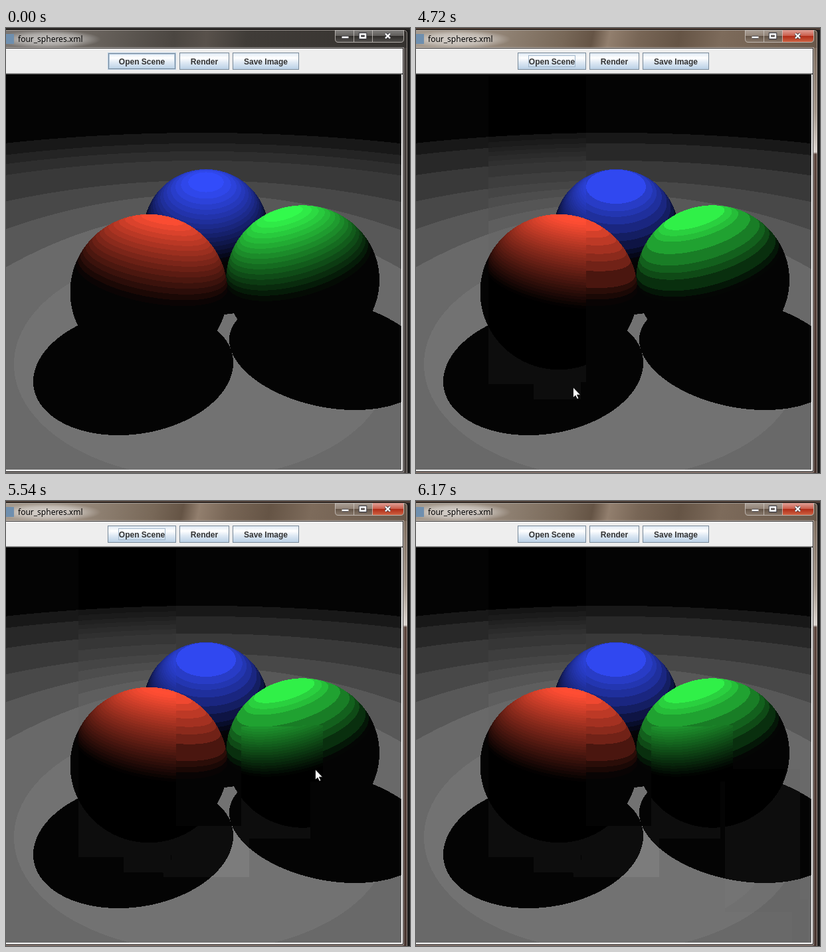
Recreate the animation shown at these times as an HTML page with a canvas. Size 608 by 671 pixels, loop 6270 ms.

```html
<!DOCTYPE html>
<html lang="en">
<head>
<meta charset="utf-8">
<title>four_spheres.xml</title>
<style>
html, body { margin: 0; width: 608px; height: 671px; overflow: hidden; background: #1e1e1e; }
canvas, svg { position: absolute; left: 0; top: 0; display: block; }
.label { font: bold 12px "Liberation Sans", Arial, sans-serif; fill: #333; text-anchor: middle; }
.title { font: 12px "Noto Sans", "Open Sans", sans-serif; fill: #000; }
</style>
</head>
<body>
<canvas id="scene" width="608" height="671"></canvas>
<svg width="608" height="671" viewBox="0 0 608 671">
  <defs>
    <linearGradient id="dim" gradientUnits="userSpaceOnUse" x1="0" y1="0" x2="600" y2="60">
      <stop offset="0" stop-color="#7b7672"/><stop offset=".2" stop-color="#6c6660"/>
      <stop offset=".42" stop-color="#4b4641"/><stop offset=".5" stop-color="#58514b"/>
      <stop offset=".6" stop-color="#403c38"/><stop offset="1" stop-color="#35322f"/>
    </linearGradient>
    <linearGradient id="wood" gradientUnits="userSpaceOnUse" x1="0" y1="0" x2="600" y2="120">
      <stop offset="0" stop-color="#a59a8e"/><stop offset=".2" stop-color="#938577"/>
      <stop offset=".36" stop-color="#786858"/><stop offset=".43" stop-color="#655445"/>
      <stop offset=".47" stop-color="#927f6e"/><stop offset=".54" stop-color="#786656"/>
      <stop offset=".64" stop-color="#655445"/><stop offset=".74" stop-color="#7d6b5b"/>
      <stop offset="1" stop-color="#675648"/>
    </linearGradient>
    <linearGradient id="side" x1="0" y1="0" x2="0" y2="1">
      <stop offset="0" stop-color="#7d6c5e"/><stop offset=".15" stop-color="#a3968a"/>
      <stop offset=".245" stop-color="#dcd5d0"/><stop offset=".25" stop-color="#5d473f"/>
      <stop offset="1" stop-color="#493731"/>
    </linearGradient>
    <radialGradient id="glow">
      <stop offset="0" stop-color="#fff" stop-opacity=".62"/>
      <stop offset=".6" stop-color="#fff" stop-opacity=".4"/>
      <stop offset="1" stop-color="#fff" stop-opacity="0"/>
    </radialGradient>
    <linearGradient id="steel" x1="0" y1="0" x2="0" y2="1">
      <stop offset="0" stop-color="#dde8f3"/><stop offset=".3" stop-color="#fff"/>
      <stop offset=".6" stop-color="#dde8f3"/><stop offset="1" stop-color="#b8cfe5"/>
    </linearGradient>
    <linearGradient id="glass" x1="0" y1="0" x2="0" y2="1">
      <stop offset="0" stop-color="#fff" stop-opacity=".38"/>
      <stop offset=".48" stop-color="#fff" stop-opacity=".2"/>
      <stop offset=".5" stop-color="#000" stop-opacity=".18"/>
      <stop offset="1" stop-color="#fff" stop-opacity=".12"/>
    </linearGradient>
    <linearGradient id="red" x1="0" y1="0" x2="0" y2="1">
      <stop offset="0" stop-color="#e0a298"/><stop offset=".48" stop-color="#cb5d4b"/>
      <stop offset=".5" stop-color="#ae2a16"/><stop offset="1" stop-color="#cf6242"/>
    </linearGradient>
  </defs>

  <g id="idle">
    <path d="M0 0H608V3H0z" fill="#2b2826"/>
    <path d="M0 3H600Q604 3 604 7V31H0z" fill="url(#dim)"/>
    <path d="M597 30H604V671H0V668H597z" fill="#47413e"/>
  </g>
  <g id="active">
    <path d="M0 0H608V3H0z" fill="#4d3d35"/>
    <path d="M0 3H600Q604 3 604 7V31H0z" fill="url(#wood)"/>
    <path d="M597 30H604V671H597z" fill="url(#side)"/>
    <path d="M0 668H597V671H0z" fill="#5a463e"/>
  </g>
  <path d="M0 2.5H600Q604.5 3 604.5 8V671" fill="none" stroke="#141211"/>
  <path d="M0 3.5H599Q603.5 4 603.5 8V671" fill="none" stroke="#cfc8c3" stroke-opacity=".6"/>
  <ellipse cx="65" cy="17" rx="78" ry="14" fill="url(#glow)"/>
  <rect x="0" y="9" width="12" height="15" fill="#6f8fae"/>
  <text class="title" x="18" y="21">four_spheres.xml</text>

  <path d="M495.500 3V17Q495.500 21.500 500 21.500H594Q598.500 21.500 598.500 17V3z" fill="url(#glass)"/>
  <path id="close" d="M551 3V21H594Q598 21 598 17V3z" fill="url(#red)"/>
  <path d="M495.500 3V17Q495.500 21.500 500 21.500H594Q598.500 21.500 598.500 17V3M523.500 3V21M551.500 3V21" fill="none" stroke="#d5cfcb" stroke-opacity=".75"/>
  <g fill="none" stroke="#3d3d45" stroke-width="4">
    <path d="M506 14H515M533 9H541V15H533z" stroke-width="4.500"/>
    <path d="M571 8.500L578 15.500M578 8.500L571 15.500"/>
  </g>
  <g fill="none" stroke="#fff" stroke-width="2.400">
    <path d="M505.500 14H515.500M533 9.200H541V14.800H533z"/>
    <path d="M571 8.500L578 15.500M578 8.500L571 15.500"/>
  </g>

  <path d="M0 30H597V69H0z" fill="#eee"/>
  <path d="M596 70V667H0" fill="none" stroke="#fff" stroke-width="2"/>
  <path d="M0 29.500H598.500V669.500H0" fill="none" stroke="#fff" stroke-opacity=".5"/>
  <path d="M0 30.500H597.500V668.500H0" fill="none" stroke="#2c2827"/>
  <path d="M0 68.500H597" stroke="#9a9a9a"/>
  <path d="M0 69.500H596" stroke="#555"/>
  <g fill="url(#steel)" stroke="#7a8a99">
    <rect x="153.500" y="37.500" width="102" height="25"/>
    <rect x="261.500" y="37.500" width="74" height="25"/>
    <rect x="341.500" y="37.500" width="99" height="25"/>
  </g>
  <g id="hover" fill="none" stroke="#b8cfe5">
    <rect x="153.500" y="37.500" width="102" height="25"/>
    <rect x="154.500" y="38.500" width="100" height="23" stroke="#7a8a99"/>
    <rect x="155.500" y="39.500" width="98" height="21"/>
  </g>
  <rect id="focus" x="169.500" y="41.500" width="70" height="17" fill="none" stroke="#a3b8cc"/>
  <g class="label">
    <text x="204.500" y="55">Open Scene</text>
    <text x="298.500" y="55">Render</text>
    <text x="391" y="55">Save Image</text>
  </g>
  <path id="cursor" d="M.5.800V16.500L4 13.200 6.600 18.500 8.900 17.400 6.400 12.200H11.500z" fill="#fff" stroke="#000" stroke-width=".8"/>
</svg>
<script>
const LOOP = 6270, W = 595, TOP = 70, BOTTOM = 666;
const FINE = 0, COARSE = 1, SMOOTH = 2;
const $ = id => document.getElementById(id);
const rad = deg => deg * Math.PI / 180;

// dist: eye distance, az/tilt: light direction, lamp: light distance (in radii)
const spheres = [
  { x: 215, y: 398, rx: 118.5, ry: 117.2, dist: 4.6, az: 79.5, tilt: 67, lamp: 3.5,
    rgb: [255, 77, 51], cuts: [.87, .79, .695, .59, .5, .385, .196, .13, .07, 0] },
  { x: 446.5, y: 380, rx: 115.5, ry: 112.7, dist: 4.92, az: 106, tilt: 62, lamp: 3.2,
    rgb: [51, 255, 77], cuts: [.85, .78, .71, .56, .42, .33, .25, .12, .05, 0] },
  { x: 301, y: 307, rx: 94, ry: 94, dist: 5.66, az: 90, tilt: 48, lamp: 3.57,
    rgb: [51, 77, 255], cuts: [.82, .73, .66, .56, .44, .33, .2, .13, .06, 0] }
];

// Tilted ellipses: half extents and shear
const shadows = [
  { x: 191.5, y: 519, a: 150.5, b: 95, s: -2107 },
  { x: 487, y: 491.5, a: 151, b: 84.5, s: 3246 },
  { x: 305, y: 380, a: 120, b: 53, s: 0 }
];

// Floor bands: apex height, curvature and grey
const apex = [158, 174, 186, 200, 230, 251, 278];
const bend = [.00018, .0002, .00022, .00025, .00036, .0006, .00095];
const greys = [[24, 36, 46, 57, 72, 88, 106], [24, 40, 40, 57, 72, 88, 105]];

function mix(list, k) {
  const i = Math.floor(k), f = k - i;
  return f ? list[i] * (1 - f) + list[i + 1] * f : list[i];
}

// Diffuse light on a sphere, or null outside it
function light(s, x, y) {
  const u = (x - s.x) / s.rx, v = (y - s.y) / s.ry, r = Math.hypot(u, v);
  if (r >= 1) return null;
  const slope = r / Math.sqrt(s.dist ** 2 - 1);
  const cos = 1 / Math.hypot(1, slope), sin = slope * cos;
  const ray = s.dist * cos - Math.sqrt(Math.max(0, 1 - (s.dist * sin) ** 2));
  const side = (u * Math.cos(rad(s.az)) - v * Math.sin(rad(s.az))) / (r || 1);
  const dot = ray * sin * side * Math.sin(rad(s.tilt)) + (s.dist - ray * cos) * Math.cos(rad(s.tilt));
  return (s.lamp * dot - 1) / Math.sqrt(1 + s.lamp ** 2 - 2 * s.lamp * dot);
}

function tone(s, v, mode) {
  if (mode === SMOOTH) return v < -.03 ? 0 : Math.min(1, (Math.floor((v + .03) * 32) + .5) / 32);
  if (v < 0) return 0;
  if (mode === FINE) return (Math.floor(v * 16) + .7) / 16;
  const i = s.cuts.findIndex(c => v >= c);
  return i ? (s.cuts[i - 1] + s.cuts[i]) / 2 : .94;
}

function inShadow(o, x, y) {
  const dx = x - o.x, dy = y - o.y, A = o.a ** 2, B = o.b ** 2;
  return B * dx * dx - 2 * o.s * dx * dy + A * dy * dy < A * B - o.s ** 2;
}

function floorGrey(x, y, mode) {
  const dx = x - 295, e = (dx / 283) ** 2 + ((y - 507) / 172) ** 2;
  if (e < 1) return mode === SMOOTH ? 124 - 4 * Math.floor(e * 4) : 114;
  const step = mode === SMOOTH ? .5 : 1, dim = mode === SMOOTH ? 3 : 0;
  for (let k = 6; k >= 0; k -= step)
    if (y > mix(apex, k) + mix(bend, k) * dx * dx) return mix(greys[mode % 2], k) - dim;
  return -1;
}

function pixel(x, y, mode) {
  const dark = mode === SMOOTH ? 0 : 4;
  for (const s of spheres) {
    const v = light(s, x, y);
    if (v !== null) {
      const q = tone(s, v, mode);
      return s.rgb.map(c => Math.max(dark, c * q));
    }
  }
  let g = floorGrey(x, y, mode);
  if (g < 0) g = dark;
  else if (shadows.some(o => inShadow(o, x, y))) g = mode === SMOOTH ? 13 : 4;
  return [g, g, g];
}

function render(mode) {
  const c = document.createElement("canvas");
  c.width = 608; c.height = 671;
  const g = c.getContext("2d"), img = g.createImageData(W, BOTTOM - TOP);
  let i = 0;
  for (let y = TOP; y < BOTTOM; y++)
    for (let x = 0; x < W; x++) {
      const p = pixel(x + .5, y + .5, mode);
      for (const v of p) img.data[i++] = v;
      img.data[i++] = 255;
    }
  g.putImageData(img, 0, TOP);
  return c;
}

const views = [FINE, COARSE, SMOOTH].map(render);

// Pointer stops: time, x, y; each move repaints the area it spans
const stops = [
  [4480, 109, 516], [4600, 177, 518], [4720, 236, 541], [4840, 237, 542], [4960, 249, 548],
  [5110, 354, 490], [5260, 446, 340], [5380, 449, 338], [5540, 465, 404],
  [5680, 566, 601], [5800, 578, 651]
];
const patches = stops.map(([t, x, y], i) => {
  if (!i) return [t, 109, TOP, 256, 534];
  const [, px, py] = stops[i - 1];
  return [t, Math.min(x, px), Math.min(y, py), Math.max(x, px) + 12, Math.max(y, py) + 19];
});

const ctx = $("scene").getContext("2d");
const show = (id, on) => $(id).style.display = on ? "" : "none";
let last = "";

function draw(t) {
  const active = t >= 3800, n = stops.filter(s => t >= s[0]).length;
  const pointer = n > 0 && t < 5920, focus = active && t < 6170;
  const key = [active, n, pointer, focus].join();
  if (key === last) return;
  last = key;
  ctx.drawImage(views[active ? COARSE : FINE], 0, 0);
  for (const [, x0, y0, x1, y1] of patches.slice(0, n)) {
    const w = Math.min(x1, W) - x0, h = Math.min(y1, BOTTOM) - y0;
    ctx.drawImage(views[SMOOTH], x0, y0, w, h, x0, y0, w, h);
  }
  show("idle", !active);
  show("active", active);
  show("close", active);
  show("hover", t < 4480);
  show("focus", focus);
  show("cursor", pointer);
  if (pointer) $("cursor").setAttribute("transform", `translate(${stops[n - 1][1]} ${stops[n - 1][2]})`);
}

function tick() {
  draw(performance.now() % LOOP);
  requestAnimationFrame(tick);
}
tick();
</script>
</body>
</html>
```
